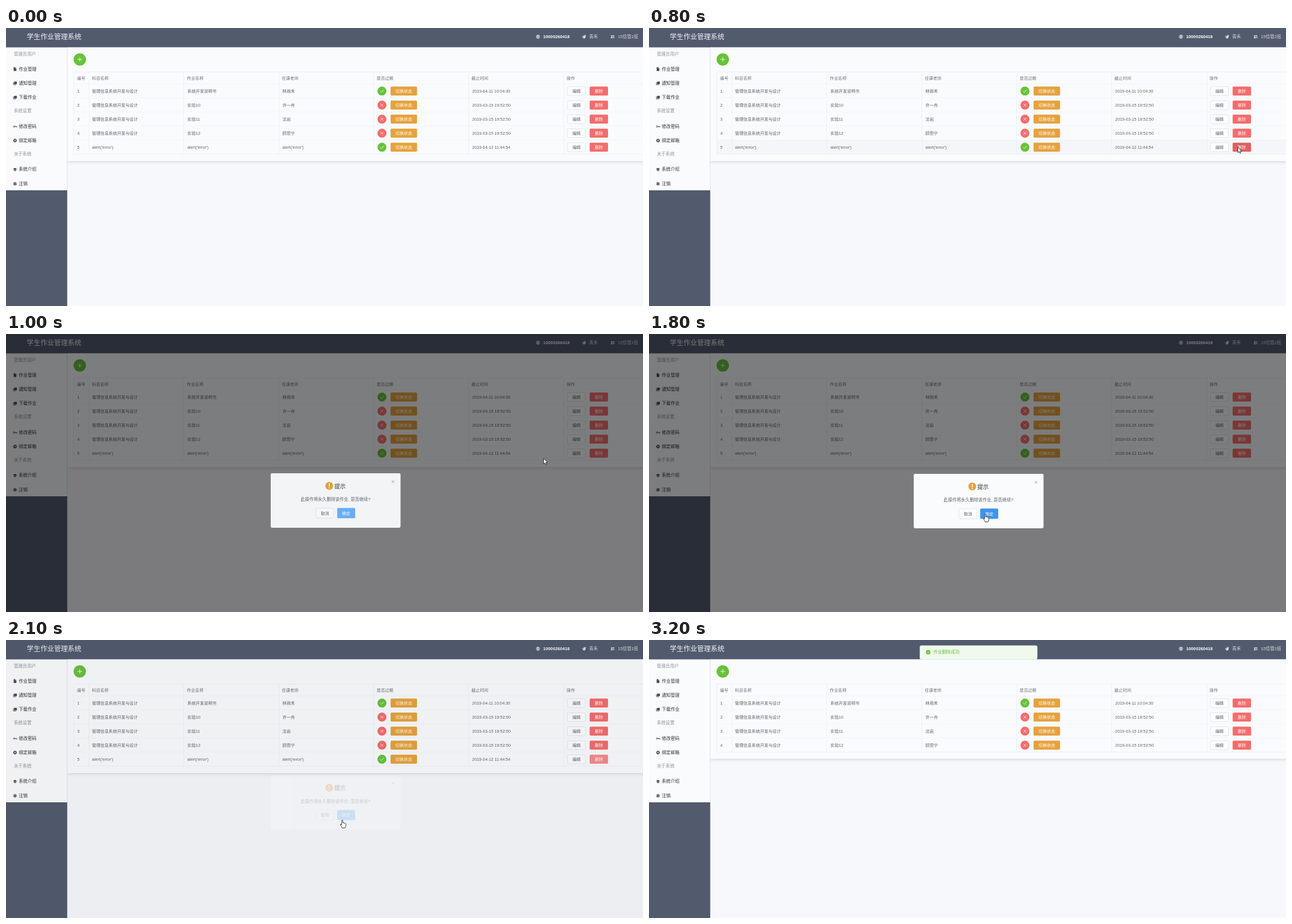
These frames come from a looping animation (1131x495 px, 3.7 s). An HTML page:

```html
<!DOCTYPE html>
<html lang="zh-CN">
<head>
<meta charset="utf-8">
<title>学生作业管理系统</title>
<style>
  html, body { margin: 0; width: 100%; height: 100%; overflow: hidden; background: #f7f8fb; }
  svg { display: block; width: 100%; height: 100%; }
  text { font-family: "Liberation Sans", "Noto Sans CJK SC", "Noto Sans CJK", sans-serif; white-space: pre; }
  .panel { filter: drop-shadow(0 1.2px 3px rgba(0, 0, 0, .16)); }
  .grid { stroke: #ebeef5; stroke-width: .8; fill: none; }
  .line { fill: none; stroke: #fff; stroke-width: .9; stroke-linecap: round; stroke-linejoin: round; }
</style>
</head>
<body>
<svg id="stage" viewBox="0 0 1131 495" preserveAspectRatio="none"></svg>
<script>
const INK = '#606266', NAVY = '#525b6e', PAPER = '#f9fbfd';
const GREEN = '#67c23a', RED = '#f56c6c', AMBER = '#e6a23c';
const LOOP = 3700, STEP = 100;

// y is the vertical middle of the text
const text = (x, y, size, fill, str, attrs = '') =>
  `<text x="${x}" y="${(y + size * .37).toFixed(2)}" font-size="${size}" fill="${fill}" ${attrs}>${str}</text>`;
const mid = 'text-anchor="middle"';
const rect = (x, y, w, h, fill, attrs = '') =>
  `<rect x="${x}" y="${y}" width="${w}" height="${h}" fill="${fill}" ${attrs}/>`;
const circle = (x, y, r, fill, attrs = '') =>
  `<circle cx="${x}" cy="${y}" r="${r}" fill="${fill}" ${attrs}/>`;
const icon = (x, y, body) => `<g transform="translate(${x} ${y})">${body}</g>`;
const path = (d, fill, attrs = '') => `<path d="${d}" fill="${fill}" ${attrs}/>`;
const button = (x, y, w, h, fill, label, id = '') =>
  rect(x, y, w, h, fill, `rx="1.8" ${id}`) + text(x + w / 2, y + h / 2, 7.4, '#fff', label, mid);
const plainButton = (x, y, w, h, label) =>
  rect(x, y, w, h, '#fcfdfe', 'rx="1.8" stroke="#dcdfe6" stroke-width=".8"') +
  text(x + w / 2, y + h / 2, 7.4, INK, label, mid);

const dark = '#454a59';
const spokes = (n, r, w) => Array.from({ length: n }, (_, i) =>
  `<path d="M0 0V${-r}" stroke="${dark}" stroke-width="${w}" transform="rotate(${i * 360 / n})"/>`).join('');
const glyphs = {
  doc: path('M-2.4-3.3H.6L2.4-1.4V3.3H-2.4Z', dark) + path('M.5-3.2V-1.3H2.3', 'none', 'stroke="#fff" stroke-width=".5"'),
  copy: path('M-1.8-2.9H3.3V1.6H-1.8Z', dark) + path('M-2.9-1.6V2.7H2', 'none', `stroke="${dark}" stroke-width=".9"`),
  key: circle(-1.6, .3, 1.3, 'none', `stroke="${dark}" stroke-width="1"`) +
    path('M-.2.3H3.2V1.8M1.7.3V1.5', 'none', `stroke="${dark}" stroke-width="1"`),
  gear: spokes(8, 3.3, 1.4) + circle(0, 0, 2.5, dark) + circle(0, 0, 1.1, '#fff'),
  cap: path('M0-2.8L3.6-1 0 .8-3.6-1Z', dark) + path('M-2.3.4L0 1.6 2.3.4V1.9Q0 3.6-2.3 1.9Z', dark),
  flake: spokes(6, 3.4, 1.3) + circle(0, 0, 1.9, dark) + circle(0, 0, .7, '#fff')
};

function header() {
  const soft = '#d9dce4';
  return rect(0, 0, 1131, 34.3, NAVY) +
    text(37, 15.3, 12.1, '#f2f4f8', '学生作业管理系统') +
    icon(944.5, 15.5, circle(0, 0, 2.9, 'none', 'stroke="#fff"') + circle(0, -.7, 1.2, '#fff') + path('M-1.8 2Q0-.3 1.8 2Z', '#fff')) +
    text(953.8, 15, 7.7, '#fff', '10000260418', 'font-weight="bold"') +
    icon(1026.5, 15.5, path('M-3.3-1L-1-.6-.6-3H.8V-1L2-3H3.2L2.4 1.2 1.4 3H-2L-1.6 1.2-3.4.6Z', soft)) +
    text(1035.3, 15, 7.8, soft, '青禾') +
    icon(1077, 15.5, circle(-1.3, -1.2, 1.4, soft) + circle(1.6, -1.5, 1.2, soft) +
      path('M-3.5 2.8Q-3.3.4-1.3.4T.9 2.8Z', soft) + path('M1.3 2.2Q1 .3 2 .1T3.6 2.2Z', soft)) +
    text(1086.5, 15, 7.7, soft, '15信管2班');
}

function sidebar() {
  const groups = [[46, '管理员用户'], [147.5, '系统设置'], [224.5, '关于系统']];
  const items = [[72.7, 'doc', '作业管理'], [98, 'copy', '通知管理'], [123.3, 'copy', '下载作业'],
    [174.7, 'key', '修改密码'], [200, 'gear', '绑定邮箱'], [251.5, 'cap', '系统介绍'], [277, 'flake', '注销']];
  return rect(0, 34, 108.7, 461, NAVY) + rect(0, 34.3, 108.7, 254.7, PAPER) +
    rect(108, 34.3, .8, 254.7, '#dfe2e8') +
    groups.map(([y, s]) => text(14, y, 7.8, '#909399', s)).join('') +
    items.map(([y, g, s]) => icon(16, y + .4, glyphs[g]) + text(22.8, y, 7.8, '#303133', s)).join('');
}

function row(i, [task, teacher, done, date], subject = '管理信息系统开发与设计') {
  const y = 112 + 25 * i;
  const mark = done ? 'M-3 .2L-.9 2.3 3-2' : 'M-2.2-2.2L2.2 2.2M2.2-2.2L-2.2 2.2';
  return `<g id="row${i}">` + rect(120.5, y - 12.5, 1011, 25, PAPER, `id="bg${i}"`) +
    path(`M120.5 ${y + 12.5}H1131` + [120.5, 147.5, 315.5, 484.5, 652.5, 821.5, 990.5]
      .map(x => `M${x} ${y - 12.5}v25`).join(''), 'none', 'class="grid"') +
    text(126.4, y, 7.4, INK, i + 1) + text(152.8, y, 7.4, INK, subject) +
    text(322, y, 7.4, INK, task) + text(490.8, y, 7.4, INK, teacher) +
    circle(667.5, y + .3, 8, done ? GREEN : RED) + icon(667.5, y + .3, path(mark, 'none', 'class="line"')) +
    button(682.8, y - 7.8, 47, 16, AMBER, '切换状态') + text(827.8, y, 7.35, INK, date) +
    plainButton(996.8, y - 7.6, 32, 15.8, '编辑') +
    button(1036.3, y - 7.8, 32.6, 16, RED, '删除', `id="del${i}"`) + '</g>';
}

function table() {
  const early = '2019-03-15 19:52:50', err = "alert('error')";
  const heads = [[126, '编号'], [152.5, '科目名称'], [321, '作业名称'], [489.7, '任课老师'],
    [658, '是否过期'], [826.6, '截止时间'], [995.3, '操作']];
  return `<g class="panel">${rect(108.8, 34, 1030, 203, PAPER, 'id="panel"')}</g>` +
    circle(131, 56, 11, GREEN) + path('M127.4 56H134.6M131 52.4V59.6', 'none', 'class="line"') +
    path('M1131 78.3H120.5V99.5H1131M147.5 78.3v21.2M315.5 78.3v21.2M484.5 78.3v21.2M652.5 78.3v21.2M821.5 78.3v21.2M990.5 78.3v21.2',
      'none', 'class="grid"') +
    heads.map(([x, s]) => text(x, 88.8, 7.4, '#6f737b', s, 'font-weight="500"')).join('') +
    row(0, ['系统开发说明书', '林雨禾', true, '2019-04-11 10:04:30']) +
    row(1, ['实验10', '许一舟', false, early]) +
    row(2, ['实验11', '沈岩', false, early]) +
    row(3, ['实验12', '顾思宁', false, early]) +
    row(4, [err, err, true, '2019-04-12 11:44:54'], err);
}

const dialog = () => '<g id="dialog">' +
  rect(470, 249, 230.5, 97, PAPER, 'rx="2.4"') +
  circle(574, 271.5, 6.9, AMBER) + path('M574 267.8v4.2', 'none', 'class="line" style="stroke-width:1.7"') + circle(574, 275, 1, '#fff') +
  text(583, 272, 10.1, '#303133', '提示') +
  path('M684.8 261.5l4.6 4.6m0-4.6l-4.6 4.6', 'none', 'stroke="#909399" stroke-width=".8"') +
  text(585, 295.5, 7.7, INK, '此操作将永久删除该作业, 是否继续?', mid) +
  plainButton(550.3, 311.2, 32, 17.6, '取消') +
  button(588, 310.8, 32, 18.2, '#66b1ff', '确定', 'id="ok"') + '</g>';

const message = () => '<g id="message">' +
  rect(481, 10, 208.3, 24.4, '#f0f9eb', 'rx="2.4" stroke="#e1f3d8" stroke-width=".6"') +
  circle(495.7, 21.7, 3.9, GREEN) + icon(495.7, 21.7, path('M-1.7 .1L-.4 1.3 1.8-1.1', 'none', 'class="line"')) +
  text(505, 21.5, 7.7, GREEN, '作业删除成功') + '</g>';

const outline = 'stroke="#222" stroke-width=".9" stroke-linejoin="round"';
const pointer = () => '<g id="cursor">' +
  path('M0 0V10L2.3 7.9 3.8 11.4 5.4 10.7 4 7.3H7Z', '#fff', `id="arrow" ${outline}`) +
  path('M-1 1Q0-.7 1.1 1V5.2Q2.2 4.3 3 5.6 4.1 4.8 4.8 6 6.3 5.6 6.4 7.2V10Q6.2 12 5 14H-.2Q-.8 12-2.2 10.4L-3.4 8.3Q-3.4 7-2.1 7.5L-1 8.8Z',
    '#fff', `id="hand" ${outline}`) + '</g>';

const stage = document.getElementById('stage');
stage.innerHTML = rect(0, 0, 1131, 495, '#f7f8fb') + table() + sidebar() + header() + message() +
  rect(0, 0, 1131, 495, '#000', 'id="shade"') + dialog() + pointer();
const $ = id => document.getElementById(id);
const set = (id, name, value) => $(id).setAttribute(name, value);

// tracks: [time, ...values], linear in between
const cursorTrack = [[100, 1060, 166], [300, 1066, 195], [500, 1069, 222], [700, 1050, 215], [800, 1045.5, 212],
  [900, 1012, 215], [1000, 954.5, 221.5], [1100, 760, 255], [1200, 644, 283], [1400, 616, 306],
  [1600, 594, 319], [1800, 597, 320.5], [2400, 597, 320.5], [2600, 700, 260], [3100, 1123, 66]];
const shadeTrack = [[800, 0], [900, .36], [1000, .5], [1900, .5], [2000, .4], [2100, .04], [2200, 0]];
const dialogTrack = [[800, 0, -12], [900, .58, -5], [1000, .95, -1], [1100, 1, 0],
  [1900, 1, 0], [2000, .93, -1], [2100, .25, -8.3], [2200, 0, -12]];
const messageTrack = [[2500, 0, -34], [2600, .45, -18], [2700, .85, -6], [2900, 1, 0]];

function at(track, t) {
  const n = track.findIndex(k => k[0] >= t);
  if (n < 1) return track[n ? track.length - 1 : 0].slice(1);
  const a = track[n - 1], b = track[n], p = (t - a[0]) / (b[0] - a[0]);
  return a.slice(1).map((v, i) => v + (b[i + 1] - v) * p);
}
const within = (t, from, to) => t >= from && t < to;

function draw(t) {
  const [x, y] = at(cursorTrack, t);
  const hand = within(t, 1500, 2200);
  set('cursor', 'transform', `translate(${x} ${y})`);
  set('cursor', 'opacity', +within(t, 100, 3200));
  set('hand', 'opacity', +hand);
  set('arrow', 'opacity', +!hand);

  const over = within(t, 100, 900) ? Math.min(4, Math.floor((y - 99.5) / 25)) : -1;
  for (let i = 0; i < 5; i++) set('bg' + i, 'fill', i === over ? '#f4f6fa' : PAPER);
  const lit = within(t, 500, 800) || t >= 2100;
  set('del4', 'fill', within(t, 800, 900) ? '#dd6161' : lit ? '#f78989' : RED);
  const gone = t >= 2600;
  set('row4', 'opacity', +!gone);
  set('panel', 'height', gone ? 177.5 : 203);

  set('shade', 'opacity', at(shadeTrack, t)[0]);
  for (const [id, track] of [['dialog', dialogTrack], ['message', messageTrack]]) {
    const [alpha, dy] = at(track, t);
    set(id, 'opacity', alpha);
    set(id, 'transform', `translate(0 ${dy})`);
  }
  set('ok', 'fill', within(t, 1800, 2000) ? '#3f94ea' : '#66b1ff');
}

const start = performance.now();
function tick() {
  const t = (performance.now() - start) % LOOP;
  draw(Math.floor(t / STEP) * STEP);
  requestAnimationFrame(tick);
}
tick();
</script>
</body>
</html>
```
